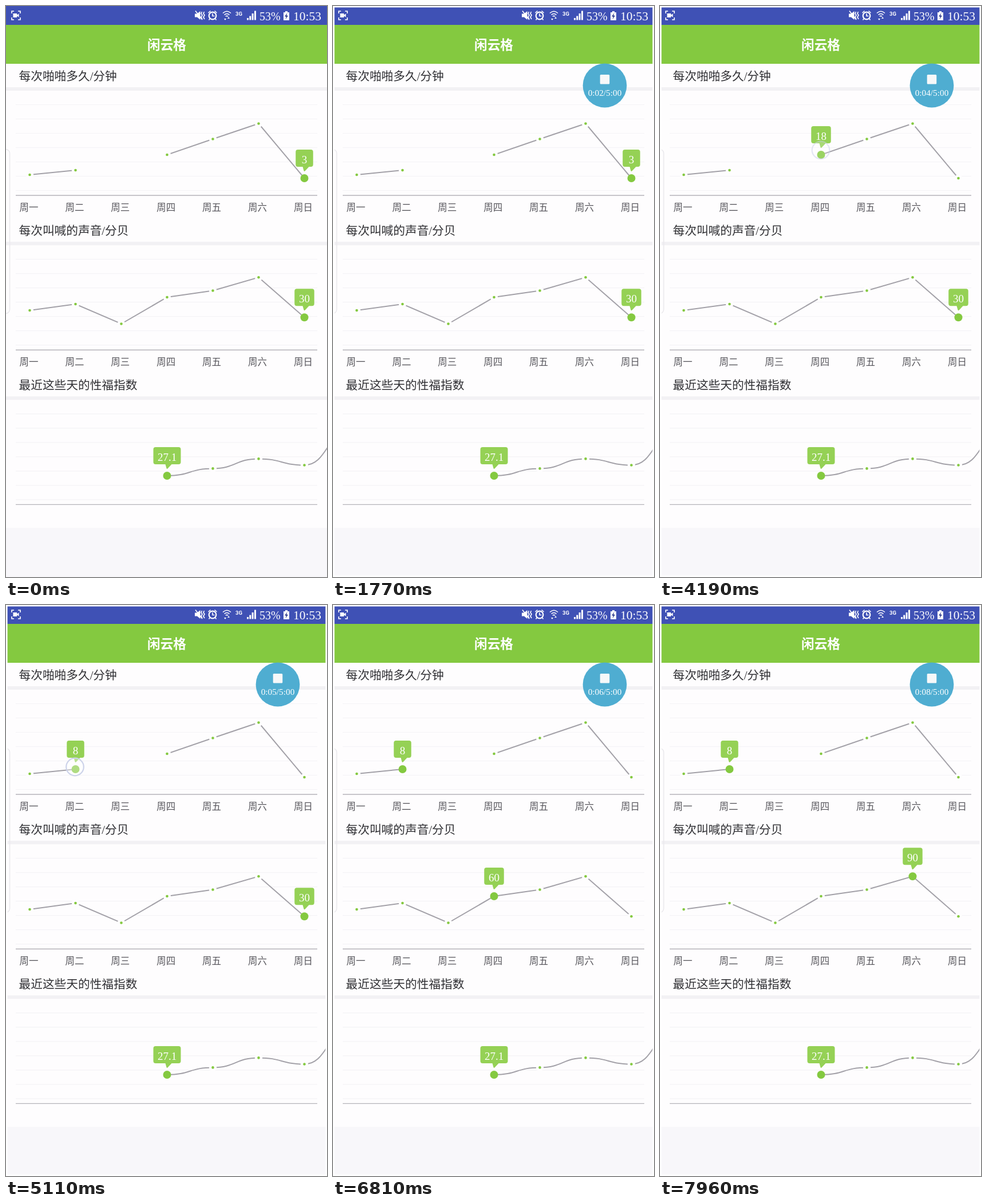
Recreate the animation shown at these times as an HTML page. Size 561x998 px, loop 8000 ms.

```html
<!DOCTYPE html>
<html lang="zh-CN">
<head>
<meta charset="utf-8">
<style>
html, body { margin: 0; width: 100%; height: 100%; overflow: hidden; background: #fefdfe; }
svg { display: block; width: 561px; height: 998px; font-family: "Liberation Serif", "Noto Sans CJK SC", "Noto Sans CJK", serif; }
.heading { font-size: 20.7px; fill: #2f2f33; }
.day { font-size: 16.5px; fill: #57565c; text-anchor: middle; }
.value { font-size: 19px; fill: #fff; text-anchor: middle; }
.curve { fill: none; stroke: #a3a1a8; stroke-width: 2; }
.grid { stroke: #f4f3f6; stroke-width: 1.2; }
.axis { stroke: #b5b3b9; stroke-width: 1.4; }
.stroke { fill: none; stroke: #fff; stroke-width: 1.6; }
</style>
</head>
<body>
<svg id="stage" viewBox="0 0 561 998">
  <rect width="561" height="998" fill="#fefdfe"/>
  <rect y="912" width="561" height="86" fill="#f8f7fa"/>
  <rect width="561" height="33" fill="#3f51b5"/>
  <rect y="33" width="561" height="68" fill="#84c940"/>
  <text x="281" y="76" text-anchor="middle" font-size="22.7" font-weight="700" fill="#fff">闲云格</text>

  <g id="status" fill="#fff">
    <path class="stroke" d="M10 13V9H14M21 9H25V13M25 20V24H21M14 24H10V20"/>
    <path d="M12.5 13H19V15.5L22.5 13.5V19.5L19 17.5V20H12.5Z"/>
    <path d="M330 13.5H334L339.5 9V24L334 19.5H330Z"/>
    <path class="stroke" d="M331 8.5L343 24M342.5 10L341 13L343 16L341 19.5L343 23M346.5 10L345 13L347 16L345 19.5L347 23"/>
    <circle class="stroke" cx="361" cy="17" r="6.3" style="stroke-width:2.2"/>
    <path class="stroke" d="M361 13V17.5H364.5M353.5 12L357.5 8.5M364.5 8.5L368.5 12M356.5 22L354.5 24.5M365.5 22L367.5 24.5"/>
    <path class="stroke" d="M379 12.5Q386 6 393 12.5M381.5 15.5Q386 11.5 390.5 15.5M383.8 18.2Q386 16.5 388.2 18.2"/>
    <path d="M381 22H385L383 25ZM387 22H391L389 19Z"/>
    <text x="401" y="16.5" font-size="9.5" font-weight="700" style="font-family:Roboto,sans-serif">3G</text>
    <path d="M421 21H424V24.5H421ZM425.3 17.5H428.3V24.5H425.3ZM429.6 13H432.6V24.5H429.6ZM434 8.5H437V24.5H434Z"/>
    <text x="443" y="24.5" font-size="20">53%</text>
    <path d="M488 9H492V11H495V25H485V11H488Z"/>
    <path d="M491.5 12L487 18.5H489.8L488.5 23.5L493 16.8H490.2Z" fill="#2f3c8c"/>
    <text x="502" y="24.5" font-size="21.5">10:53</text>
  </g>

  <g id="charts"></g>
  <rect x="-20" y="250.5" width="26.5" height="287" rx="7" fill="none" stroke="#e9e8ec" stroke-width="1.5"/>
  <g id="ring"><circle r="15.3" fill="#fff" fill-opacity=".35" stroke="#cdd3ea" stroke-width="2.2"/></g>
  <g id="recorder">
    <circle cx="475" cy="139" r="38.4" fill="#4fadd1"/>
    <rect x="466.7" y="120" width="16.6" height="16.6" rx="1.5" fill="#f6f8f9"/>
    <text id="clock" x="475" y="156.7" text-anchor="middle" font-size="15.3" fill="#fff"></text>
  </g>
  <path id="frame" d="M0 0H561V998H0Z" pathLength="1" fill="none" stroke="#fff" stroke-width="5.2" stroke-dasharray="1 1"/>
</svg>
<script>
const LOOP = 8000;
const $ = id => document.getElementById(id);
const px = i => 41.5 + 80 * i;
const clamp = v => Math.max(0, Math.min(1, v));

const charts = [
  { title: '每次啪啪多久/分钟', ys: [295, 287, null, 260, 232.5, 205.5, 301], start: [6, '3'] },
  { title: '每次叫喊的声音/分贝', ys: [532, 521, 555.5, 509, 497.5, 474.3, 544.3], start: [6, '30'] },
  { title: '最近这些天的性福指数', ys: [null, null, null, 821, 808.4, 791.4, 802.5, 742], start: [3, '27.1'], smooth: true }
];

// start time, x, y, chart, point, label
const taps = [
  [3270, 432, 228, 0, 5, '38'],
  [3960, 281, 252, 0, 3, '18'],
  [4980, 120.5, 283, 0, 1, '8'],
  [6460, 281, 514, 1, 3, '60'],
  [7290, 441, 480, 1, 5, '90']
];
const TAP_LENGTH = 310, TAP_DELAY = 70;

// moments at which the second counter advances
const seconds = [1380, 1770, 2770, 3770, 4770, 5960, 7150, 7960];

function curve({ ys, smooth }) {
  let d = '';
  ys.forEach((y, i) => {
    if (y === null) return;
    const x = px(i), prev = ys[i - 1];
    if (prev == null) d += `M${x} ${y}`;
    else if (smooth) d += `C${x - 40} ${prev} ${x - 40} ${y} ${x} ${y}`;
    else d += `L${x} ${y}`;
  });
  return d;
}

function chartMarkup(chart, k) {
  const top = 270.2 * k, { ys, title, smooth } = chart;
  let s = `<text class="heading" x="22.5" y="${top + 129.7}">${title}</text>
    <rect y="${top + 142}" width="561" height="6" fill="#f2f1f4"/>`;
  for (let y = top + 172.5; y < top + 330; y += 25)
    s += `<path class="grid" d="M17 ${y}H544"/>`;
  s += `<path class="axis" d="M17 ${top + 331}H544"/><path class="curve" d="${curve(chart)}"/>`;
  ys.forEach((y, i) => {
    if (y !== null) s += `<g transform="translate(${px(i)} ${y})"><circle r="6.6" fill="#fefdfe"/><circle r="2.3" fill="#84c940"/></g>`;
  });
  if (!smooth) [...'一二三四五六日'].forEach((c, i) => {
    s += `<text class="day" x="${40 + 79.9 * i}" y="${top + 358}">周${c}</text>`;
  });
  return s + `<g id="mark${k}"><circle r="7" fill="#84c940"/><path fill="#95d155"/><text class="value" y="-26.5"></text></g>`;
}

$('charts').innerHTML = charts.map(chartMarkup).join('');

function bubble(label) {
  const w = label.length === 1 ? 30.5 : label.length === 2 ? 34.5 : 48, h = w / 2 - 4;
  return `M${-h} -50H${h}q4 0 4 4V-24q0 4 -4 4H8L1 -12.5Q-0.5 -11.5 -1 -13L-3 -20H${-h}q-4 0 -4 -4V-46q0 -4 4 -4Z`;
}

function select(k, [i, label]) {
  const mark = $('mark' + k);
  mark.setAttribute('transform', `translate(${px(i)} ${charts[k].ys[i]})`);
  mark.children[1].setAttribute('d', bubble(label));
  mark.children[2].textContent = label;
}

function render(t) {
  const chosen = charts.map(c => c.start);
  let alpha = 0;
  for (const [at, x, y, k, i, label] of taps) {
    const age = t - at;
    if (age >= TAP_DELAY) chosen[k] = [i, label];
    if (age >= 0 && age < TAP_LENGTH) {
      alpha = Math.min(clamp((age + 20) / 80), clamp((TAP_LENGTH - age) / 150));
      $('ring').setAttribute('transform', `translate(${x} ${y})`);
    }
  }
  chosen.forEach((c, k) => select(k, c));
  $('ring').setAttribute('opacity', alpha);

  const shown = t >= 40;
  const grow = 1 - (1 - clamp(t / 740)) ** 3;
  $('recorder').setAttribute('transform', `translate(475 177.4) scale(${shown ? grow : 0}) translate(-475 -177.4)`);
  $('clock').textContent = `0:0${seconds.filter(s => t >= s).length}/5:00`;

  $('frame').setAttribute('stroke-dashoffset', 1 - clamp(t / 770));
  $('frame').setAttribute('visibility', shown ? 'visible' : 'hidden');
}

const began = performance.now();
function tick() {
  render((performance.now() - began) % LOOP);
  requestAnimationFrame(tick);
}
tick();
</script>
</body>
</html>
```
